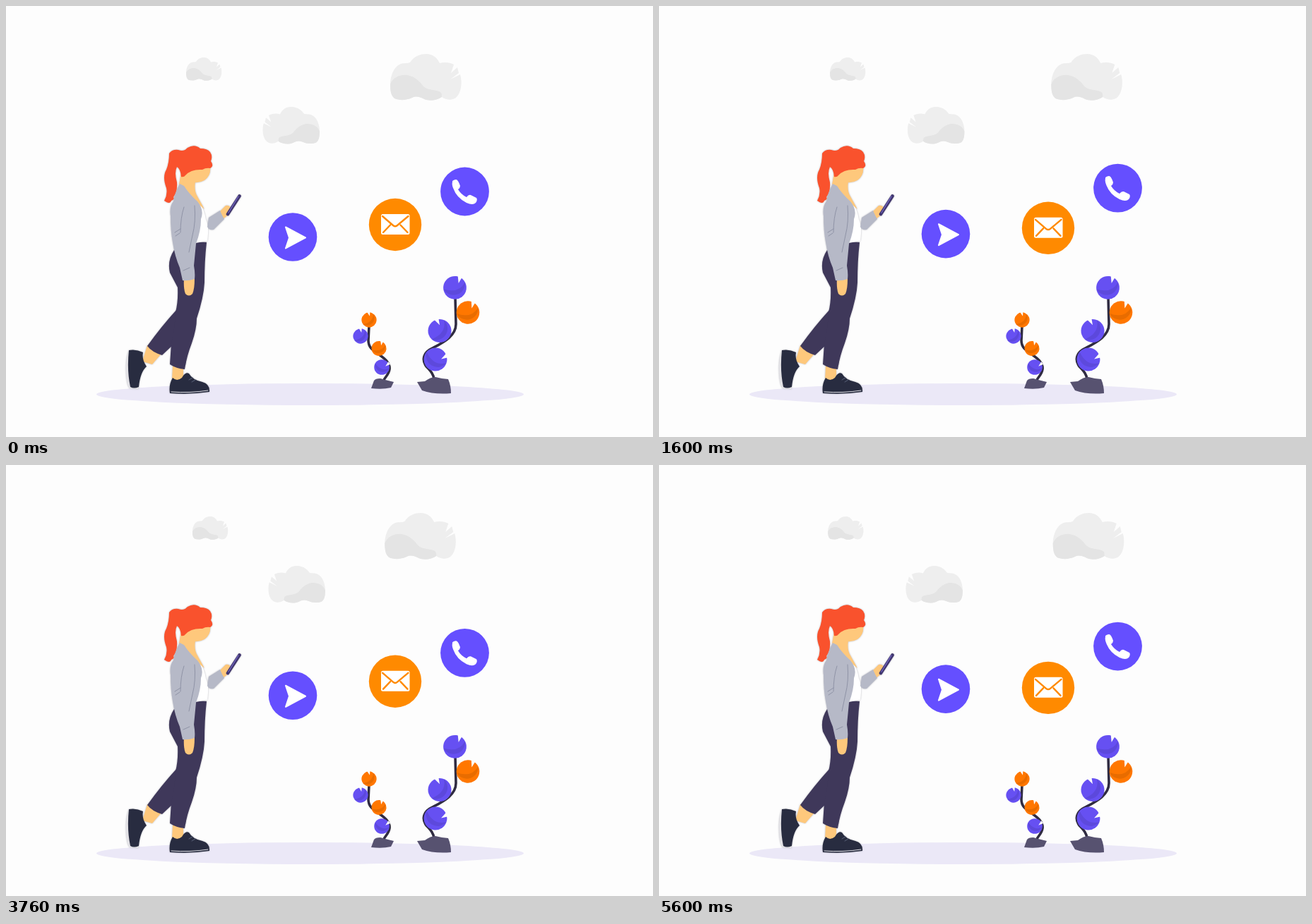
Write an HTML page that moves like this. It is 916 by 611 pixels and loops after 5680 ms.

```html
<!DOCTYPE html>
<html lang="en">
<head>
<meta charset="utf-8">
<title>Walking with a phone</title>
<style>
  html, body { margin: 0; width: 100%; height: 100%; overflow: hidden; background: #fdfdfd; }
  svg { display: block; width: 100vw; height: 100vh; }
  .bg { fill: #fdfdfd; }
  .violet { fill: #654fff; }
  .amber { fill: #ff8a00; }
  .skin { fill: #fec87c; }
  .hair { fill: #f9522d; }
  .coat { fill: #b6b9c7; }
  .pants { fill: #3f385a; }
  .shoe { fill: #282c40; }
  .rock { fill: #575270; }
  .white { fill: #fff; }
  .line { fill: none; stroke-linecap: round; stroke-linejoin: round; }
  .stem { stroke: #302c42; stroke-width: 3.6; }
  .fold { stroke: #8f93a6; stroke-width: 1; }
  #woman { filter: drop-shadow(0 0 1px #b9b9c0); }
</style>
</head>
<body>
<svg viewBox="0 0 916 611">
  <defs>
    <g id="cloud">
      <path fill="#eee" d="M6 63C1 59 0 52 0 43C0 31 5 19 13 15C18 12 24 14 28 12C34 3 42 0 51 0C60 0 66 5 70 13C77 11 85 12 90 15L86 27L95 19L97 27L85 36L99 29C102 39 101 54 94 61C89 66 80 66 73 61C66 66 55 67 48 64C42 61 37 59 31 62C22 66 13 66 6 63Z"/>
      <path fill="#e4e4e4" d="M6 63C1 59 0 52 0 43C4 33 14 29 24 30C35 32 42 39 47 46C55 53 68 50 72 55C73 57 73 59 73 61C66 66 55 67 48 64C42 61 37 59 31 62C22 66 13 66 6 63Z"/>
    </g>
    <g id="ball">
      <circle r="10"/>
      <path fill="#000" fill-opacity=".09" d="M-9.7 2.5Q4 5 8 -6A10 10 0 0 1 -9.7 2.5Z"/>
      <path class="bg" d="M1 -11L2.6 -4.2L5.2 -10.5Z"/>
    </g>
  </defs>

  <rect class="bg" width="916" height="611"/>
  <ellipse cx="430.5" cy="550.5" rx="302.5" ry="15.5" fill="#ebe8f7"/>

  <g data-x="-1"><use href="#cloud" transform="translate(255 73) scale(.5)"/></g>
  <g data-x="-.89"><use href="#cloud" transform="translate(444 143) scale(-.8 .8)"/></g>
  <g data-x=".867"><use href="#cloud" transform="translate(544 68)"/></g>

  <g id="plants">
    <path class="line stem" d="M514 454L513 474C513 485 521 489 528 494C538 501 544 507 543 515C542 522 537 526 535 530"/>
    <path class="rock" d="M517 542L521 531Q523 528 530 528L537 530L549 533L545 541Q533 544 517 542Z"/>
    <path class="line stem" d="M636 413L637 451C637 468 619 477 604 485C591 491 588 501 595 511C602 518 605 522 606 529"/>
    <path class="rock" d="M582 533L593 532Q601 526 608 526L617 528L626 529Q630 538 630 549Q606 551 589 545Z"/>
  </g>

  <g id="woman">
    <!-- back leg -->
    <path class="skin" d="M200 481L220 493L207 508L193 504Z"/>
    <path fill="#e3e2e6" d="M174 488Q169 500 170 520Q171 538 175 542L188 543L178 518Z"/>
    <path class="shoe" d="M174 488Q184 486 194 491Q192 501 199 511Q190 519 188 540Q181 543 176 540Q171 516 174 488Z"/>
    <path class="pants" d="M242 430Q220 454 200 482Q207 491 221 495L255 463L264 430Z"/>
    <!-- front leg -->
    <path class="skin" d="M236 510L251 512V530H235Z"/>
    <path class="shoe" d="M236 527Q242 533 249 527Q254 518 259 521Q264 530 278 533Q289 536 288 547Q262 551 232 549Q230 537 236 527Z"/>
    <path class="line" stroke="#dfdfe5" stroke-width="1" d="M234 547Q260 549 286 545"/>
    <path class="line" stroke="#586078" stroke-width="1" d="M259 530L264 527M263 533L268 530"/>
    <path class="pants" d="M238 346Q228 361 232 378L243 399Q244 418 240 434Q239 457 234 478L232 508Q241 514 253 515Q256 496 263 478Q270 458 270 443Q280 413 281 392Q281 362 284 335L262 334Z"/>
    <!-- torso and head -->
    <path class="white" d="M255 256L273 278Q281 288 283 303Q288 312 285 333L263 337Z"/>
    <path class="skin" d="M248 236L268 249Q266 262 271 270L281 288Q260 272 245 253Z"/>
    <path class="skin" d="M250 228L289 226Q291 240 281 247Q271 253 259 248Q249 243 250 228Z"/>
    <path class="hair" d="M231 209Q235 203 244 204Q252 207 257 201Q267 195 275 202Q285 202 289 207Q293 213 290 220Q295 227 289 230Q283 229 278 232Q262 231 254 240Q252 243 248 242Q247 231 242 228Q238 236 242 250Q243 263 237 271Q239 274 234 276Q232 282 224 276Q229 267 227 258Q221 242 227 232Q231 222 231 209Z"/>
    <!-- raised arm and phone -->
    <path class="skin" d="M302 292L311 283Q317 282 319 288L315 296L307 302Z"/>
    <path class="coat" d="M287 300L303 290Q306 297 309 302L294 317Q287 318 285 313Z"/>
    <path class="line" stroke="#41376f" stroke-width="4.6" d="M314 295L330.500 269.500"/>
    <path class="line" stroke="#7568c9" stroke-width="1.2" d="M315 293L329 270"/>
    <!-- hanging arm -->
    <path class="skin" d="M252 386H267Q267 401 264 408Q259 413 254 408Q251 400 252 386Z"/>
    <path class="coat" d="M246 252Q239 265 237 277Q231 284 233 298Q233 319 236 335Q239 355 246 371L250 389Q258 390 267 387Q268 379 266 368L269 337Q276 319 276 302Q281 289 271 277Q259 266 252 255Z"/>
    <path class="line fold" d="M252 285Q247 300 247 321M239 321L247 316M240 326L246 322M267 283Q269 306 264 325L259 349M251 375L260 371"/>
  </g>

  <g data-y="-.37" data-lead="50" data-base="-2.3">
    <circle class="violet" cx="406" cy="328" r="34.300"/>
    <path class="white" stroke="#fff" stroke-width="2" stroke-linejoin="round" d="M396 314L424 329L396 344L401 329Z"/>
  </g>
  <g data-y=".37">
    <circle class="amber" cx="551" cy="310" r="37.200"/>
    <rect class="white" x="531" y="295" width="40.500" height="29" rx="2.500"/>
    <path class="line" stroke="#ff8a00" stroke-width="2.400" d="M533 298L548 311Q551 313.500 554 311L569.500 298M534 321L544 310.500M568.500 321L558.500 310.500"/>
  </g>
  <g data-y="-.375">
    <circle class="violet" cx="649.500" cy="263" r="34.400"/>
    <path class="white" d="M632 250Q631 247 637 246Q640 246 643 255Q643 258 640 260Q644 267 652 271Q655 267 658 268L666 272Q668 275 665 279Q661 283 652 279Q638 272 633 258Q631 253 632 250Z"/>
  </g>
</svg>
<script>
  const LOOP = 5680, STEP = 80;
  const PERIOD = 1637, PEAK = 1133, TOP = 70, SPEED = 0.122;

  // x, y, radius, colour, turn of the notch
  const balls = [
    [514, 445, 10.6, '#ff7700', -20], [502, 468, 10.6, '#6650f2', -18],
    [528, 485.5, 10.6, '#ff7700', 5], [532, 512, 10.8, '#6650f2', 45],
    [635.5, 399.3, 16.4, '#6650f2', 8], [654, 434.5, 16.3, '#ff7700', 10],
    [614, 460.5, 16.5, '#6650f2', -32], [608, 501, 16.4, '#6650f2', 55]
  ];
  document.getElementById('plants').insertAdjacentHTML('beforeend', balls.map(([x, y, r, fill, turn]) =>
    `<use href="#ball" fill="${fill}" transform="translate(${x} ${y}) rotate(${turn}) scale(${r / 10})"/>`
  ).join(''));

  const parts = [...document.querySelectorAll('[data-x], [data-y]')].map(el => {
    const { x = 0, y = 0, lead = 0, base = 0 } = el.dataset;
    return { el, x: +x, y: +y, lead: +lead, base: +base };
  });

  // Linear back-and-forth sway; the loop opens slightly below the wave.
  function sway(t) {
    const half = PERIOD / 2;
    if (t < PEAK - half) return -0.095 * t;
    const phase = (t - PEAK + half) % PERIOD;
    return TOP - SPEED * Math.abs(phase - half);
  }

  function draw(now) {
    const t = Math.floor(now % LOOP / STEP) * STEP;
    for (const { el, x, y, lead, base } of parts) {
      const d = sway(t + lead);
      el.setAttribute('transform', `translate(${x * d} ${y * d + base})`);
    }
  }

  const start = performance.now();
  function tick() {
    draw(performance.now() - start);
    requestAnimationFrame(tick);
  }
  tick();
</script>
</body>
</html>
```
